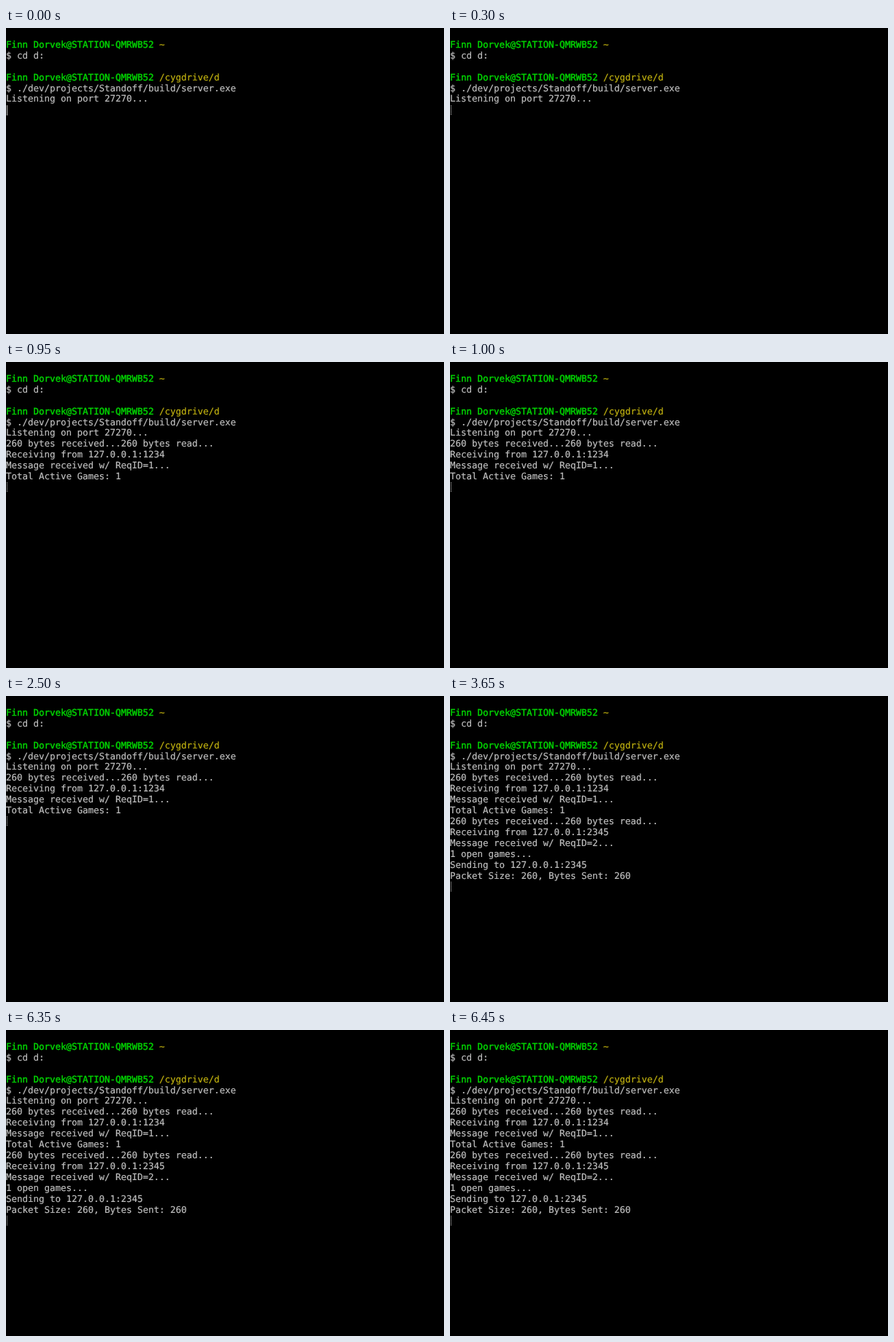
An HTML page for the animation above (8000 ms loop, 600x420 px).

```html
<!DOCTYPE html>
<html lang="en">
<head>
<meta charset="utf-8">
<title>Server terminal</title>
<style>
html, body { margin: 0; width: 100%; height: 100%; overflow: hidden; background: #000; }
pre {
  position: absolute; left: 0; top: 15.8px; margin: 0;
  font: 12.46px/14.93px "DejaVu Sans Mono", monospace;
  text-rendering: geometricPrecision;
  -webkit-text-stroke: 0.2px;
  color: #bfbfbf;
}
b { font-weight: normal; color: #00d200; -webkit-text-stroke: 0.45px; }
i { font-style: normal; color: #bfb010; }
#cursor { position: absolute; left: 1px; width: 1px; height: 14px; }
</style>
</head>
<body>
<pre><b>Finn Dorvek@STATION-QMRWB52</b> <i>~</i>
$ cd d:

<b>Finn Dorvek@STATION-QMRWB52</b> <i>/cygdrive/d</i>
$ ./dev/projects/Standoff/build/server.exe
Listening on port 27270...
<span id="log"></span></pre>
<div id="cursor"></div>
<script>
const LOOP = 8000, PITCH = 14.93, FIRST_ROW = 6;
const log = document.getElementById('log');
const cursor = document.getElementById('cursor');

const received = (port, id) => [
  '260 bytes received...260 bytes read...',
  `Receiving from 127.0.0.1:${port}`,
  `Message received w/ ReqID=${id}...`
];
const batches = [
  { at: 950, lines: [...received(1234, 1), 'Total Active Games: 1'] },
  { at: 3650, lines: [...received(2345, 2), '1 open games...',
    'Sending to 127.0.0.1:2345', 'Packet Size: 260, Bytes Sent: 260'] }
];

function draw(t) {
  const lines = batches.filter(b => t >= b.at).flatMap(b => b.lines);
  const text = lines.join('\n');
  if (log.textContent !== text) log.textContent = text;
  const row = FIRST_ROW + lines.length;
  cursor.style.top = Math.round(16 + row * PITCH) + 'px';
  // The caret is solid at first, then dotted
  cursor.style.background = t < 50 ? '#bfbfbf'
    : 'repeating-linear-gradient(#a8a8a8 0 1px, #202020 1px 2px)';
}

const start = performance.now();
function tick() {
  draw((performance.now() - start) % LOOP);
  requestAnimationFrame(tick);
}
tick();
</script>
</body>
</html>
```
